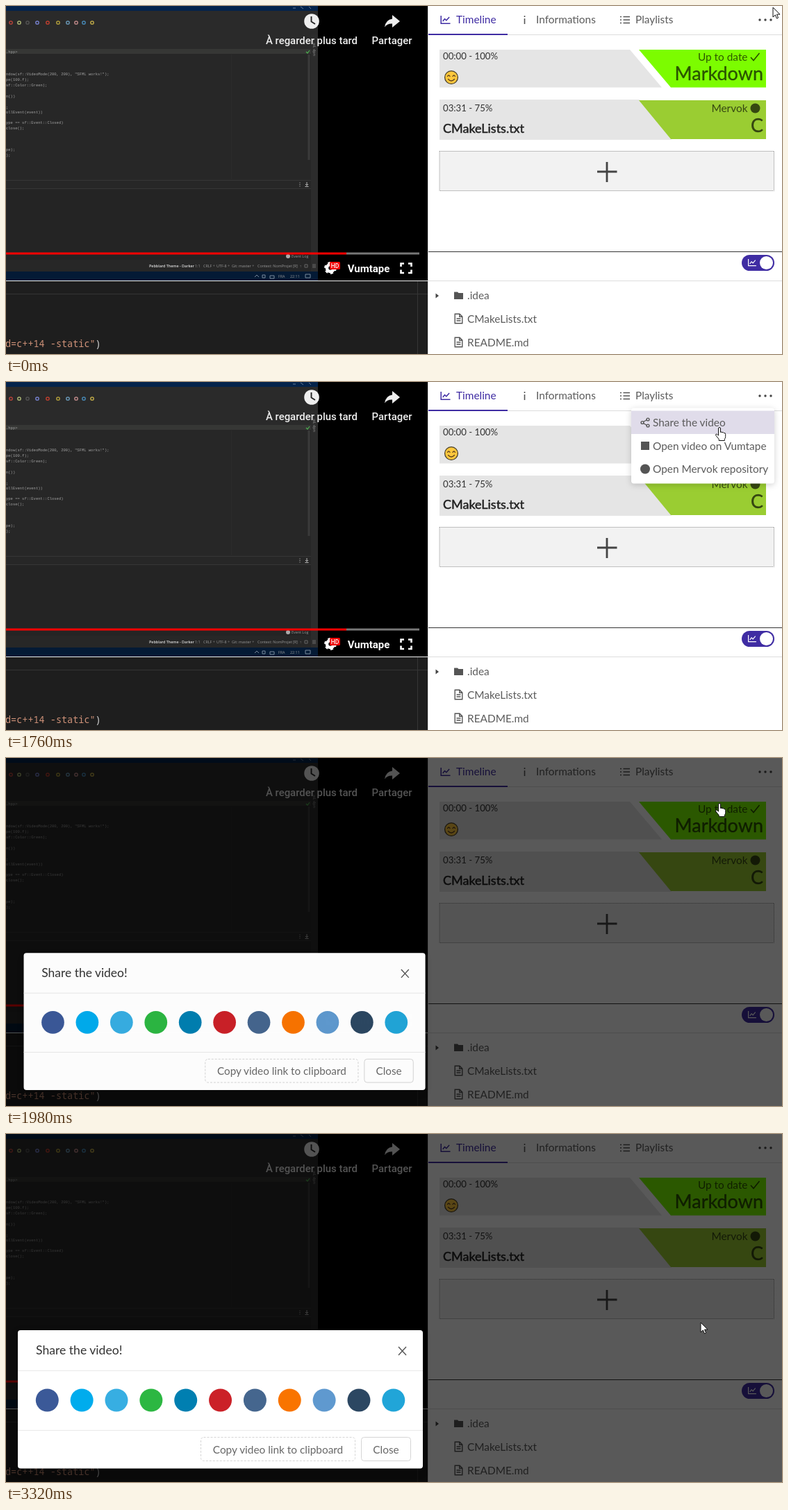
An HTML page for the animation above (3380 ms loop, 1117x502 px).

```html
<!DOCTYPE html>
<html lang="en">
<head>
<meta charset="utf-8">
<title>Share the video</title>
<style>
  html, body { margin: 0; width: 100%; height: 100%; overflow: hidden; background: #fff; }
  svg { display: block; width: 1117px; height: 502px; }
  text { font: 15.4px Lato, sans-serif; fill: #5c5c5c; white-space: pre; }
  .small { font-size: 13.2px; fill: #333; }
  .big { font-size: 27px; }
  .file { font-size: 18px; fill: #222; stroke: #222; stroke-width: .5; }
  .tag text { fill: #000; fill-opacity: .65; text-anchor: end; }
  .tag .big { stroke: #000; stroke-opacity: .5; stroke-width: .4; }
  .player text { font: 500 14.9px Roboto, sans-serif; fill: #eee; text-anchor: middle; }
  .tiny text { font: 5.5px "Liberation Mono", monospace; fill: #a0a0a0; }
  .tiny .ui { font: 5.4px "Open Sans", sans-serif; fill: #999; }
  .code { font: 13.5px "Noto Sans Mono", monospace; fill: #ce9178; }
  .line { fill: none; stroke: #555; stroke-width: 1.4; }
  .modal .mid { fill: #686868; text-anchor: middle; }

  /* Every animation is paused and placed by the clock in --t. */
  .mask, .menu, .hover, .modal, .cursor, .arrow, .hand {
    animation-play-state: paused;
    animation-fill-mode: both;
    animation-delay: calc((var(--at, 0) - var(--t, 0)) * 1ms);
  }
  .mask { --at: 1760; animation-name: fade; animation-duration: 200ms; animation-timing-function: linear; }
  .hover { --at: 1460; animation-name: fade; animation-duration: 280ms; animation-timing-function: ease-in-out; }
  .modal {
    --at: 1760;
    animation-name: zoom; animation-duration: 300ms;
    animation-timing-function: cubic-bezier(.08, .82, .17, 1);
    transform-origin: 1025px 66px;
  }
  .menu {
    animation-name: drop, lift;
    animation-duration: 200ms;
    animation-timing-function: cubic-bezier(.23, 1, .32, 1), cubic-bezier(.755, .05, .855, .06);
    animation-fill-mode: both, forwards;
    animation-delay: calc((920 - var(--t, 0)) * 1ms), calc((1760 - var(--t, 0)) * 1ms);
    transform-origin: 900px 37px;
  }
  .cursor { animation-name: move; animation-duration: 3380ms; animation-timing-function: ease-in-out; }
  .arrow, .hand { animation-duration: 3380ms; animation-timing-function: step-end; }
  .arrow { animation-name: arrow; }
  .hand { animation-name: hand; }
  .menu > rect:first-child { filter: drop-shadow(0 2px 4px rgba(0, 0, 0, .18)); }
  .modal > rect:first-child { filter: drop-shadow(0 4px 6px rgba(0, 0, 0, .15)); }

  @keyframes fade { from { opacity: 0; } to { opacity: 1; } }
  @keyframes zoom { from { opacity: 0; transform: scale(0); } to { opacity: 1; transform: scale(1); } }
  @keyframes drop { from { opacity: 0; transform: scaleY(.8); } to { opacity: 1; transform: scaleY(1); } }
  @keyframes lift { from { opacity: 1; transform: scaleY(1); } to { opacity: 0; transform: scaleY(.8); } }
  @keyframes move {
    0%, 8% { transform: translate(1104px, 2px); }
    21.8%, 38% { transform: translate(1098px, 17px); }
    50%, 85.3% { transform: translate(1027px, 65px); }
    97.8%, 100% { transform: translate(1000px, 272px); }
  }
  @keyframes arrow { 0% { opacity: 1; } 17% { opacity: 0; } 85.4%, 100% { opacity: 1; } }
  @keyframes hand { 0% { opacity: 0; } 17% { opacity: 1; } 85.4%, 100% { opacity: 0; } }
</style>
</head>
<body>
<svg viewBox="0 0 1117 502" xmlns="http://www.w3.org/2000/svg">
  <defs>
    <g id="chart" fill="none"><path d="M.7 0V11.3H14M3.2 8 6 4.6 8.4 6.8 12.6 2"/></g>
    <g id="page"><path class="line" d="M.7.7H7.5L11.3 4.5V14.3H.7ZM7.3.9V4.7H11M3 7.5H9M3 10.5H9"/></g>
  </defs>

  <!-- video -->
  <rect width="607" height="396" fill="#000"/>
  <g class="tiny">
    <rect width="449" height="396" fill="#272727"/>
    <rect width="449" height="7" fill="#04234b"/>
    <path d="M413 3h4M424 1l4 3M436 1l3 3" stroke="#7d93ad" stroke-width=".8"/>
    <rect y="7" width="449" height="55" fill="#2a2a2a"/>
    <rect y="62" width="439" height="7" fill="#363735"/>
    <rect x="439" y="41" width="10" height="342" fill="#2c2c2c"/>
    <path d="M324.500 70V250" stroke="#2c2c2c"/>
    <rect x="434.500" y="70" width="3" height="152" fill="#3b3b3b"/>
    <path d="M432 66l2 2 3-4" fill="none" stroke="#4caf50" stroke-width="1.200"/>
    <path d="M0 251.500H439M0 263.500H439" stroke="#363636"/>
    <rect y="264" width="439" height="102" fill="#242424"/>
    <path d="M423 254.500v1M423 257v1M423 259.500v1M433 254v5M431 257l2 2 2-2M430.500 260.500h5" fill="none" stroke="#bbb"/>
    <g id="tools"></g>
    <g id="lines"></g>
    <text class="ui" transform="translate(442 53) rotate(90)">ad, dpn</text>
    <circle cx="406" cy="361" r="3" fill="#aaa"/>
    <text class="ui" x="411" y="363">Event Log</text>
    <text class="ui" x="206" y="377" style="fill:#ddd;font-weight:600">Pebblard Theme - Darker</text>
    <text class="ui" x="272" y="377">1:1</text>
    <text class="ui" x="284" y="377">CRLF ÷</text>
    <text class="ui" x="303" y="377">UTF-8 ÷</text>
    <text class="ui" x="325" y="377">Git: master ÷</text>
    <text class="ui" x="362" y="377">Context: NomProjet [R]  ↑</text>
    <path d="M430 373h4v4h-4zM441 373h5M441 375h5M441 377h5" fill="none" stroke="#777" stroke-width=".8"/>
    <rect y="383" width="449" height="13" fill="#041a35"/>
    <path d="M358 391l3-3 3 3M369 388h4v4h-4zM380 389h6v4h-6zM431 387h7v5h-7z" fill="none" stroke="#8797a9" stroke-width=".9"/>
    <text class="ui" x="392" y="392">FRA</text>
    <text class="ui" x="409" y="392">22:11</text>
  </g>
  <g class="player">
    <circle cx="440" cy="22" r="10.800" fill="#eee"/>
    <path d="M439.500 15V22.500L445 26" fill="none" stroke="#222" stroke-width="1.900"/>
    <text x="440" y="55">À regarder plus tard</text>
    <path d="M556 13 567 22 556 31V25.500Q549 25 545 30.500 546.500 20 556 18.500Z" fill="#eee"/>
    <text x="555.500" y="55">Partager</text>
    <rect x="490" y="355.500" width="105" height="3" fill="#777"/>
    <rect y="355.500" width="490" height="3" fill="#f00"/>
    <circle cx="467" cy="378" r="5" fill="none" stroke="#fff" stroke-width="4.500"/>
    <circle cx="467" cy="378" r="7.700" fill="none" stroke="#fff" stroke-width="2.400" stroke-dasharray="4 4.060"/>
    <rect x="466" y="369" width="15" height="11" rx="1.500" fill="#e00"/>
    <text x="473.500" y="377.800" style="font-size:8.500px;fill:#fff">HD</text>
    <text x="522" y="384" style="font-size:15px;font-weight:700;fill:#fff">Vumtape</text>
    <path d="M568.500 376V371.500H573M579 371.500H583.500V376M583.500 380.500V385H579M573 385H568.500V380.500" fill="none" stroke="#fff" stroke-width="2.600"/>
  </g>

  <!-- code editor -->
  <rect y="396" width="607" height="106" fill="#1e1e1e"/>
  <path d="M0 415.500H607M592.500 397V502" stroke="#353535"/>
  <path d="M0 396.500H607" stroke="#eee"/>
  <text class="code" x="-1" y="492">d=c++14 -static"<tspan fill="#d4d4d4">)</tspan></text>

  <!-- side panel -->
  <rect x="607" width="510" height="502" fill="#fff"/>
  <path d="M607.500 0V502M608 41.500H1117M608 396.500H1117" stroke="#ddd"/>
  <path d="M608 41H722" stroke="#3f2ca3" stroke-width="2"/>
  <use href="#chart" x="625.500" y="14" stroke="#3f2ca3" stroke-width="1.500"/>
  <text x="648" y="25" style="fill:#3f2ca3">Timeline</text>
  <path d="M746.500 18V26M746.500 14V16" stroke="#555" stroke-width="1.600"/>
  <text x="763" y="25">Informations</text>
  <path d="M888.500 15.500H898M888.500 20H898M888.500 24.500H898M884 15.500H886M884 20H886M884 24.500H886" stroke="#555" stroke-width="1.500"/>
  <text x="906" y="25">Playlists</text>
  <g fill="#444"><circle cx="1085" cy="20" r="1.700"/><circle cx="1093" cy="20" r="1.700"/><circle cx="1101" cy="20" r="1.700"/></g>

  <path d="M624 63H898L944 117.500H624ZM624 135H912L958 193H624Z" fill="#e5e5e5"/>
  <path d="M911 63H1094V117.500H957Z" fill="#7cfc00"/>
  <path d="M911 136H1094V192H957Z" fill="#9acd32"/>
  <text class="small" x="629" y="77">00:00 - 100%</text>
  <g fill="none" stroke="#5d4020" stroke-width="1.300" stroke-linecap="round">
    <circle cx="641" cy="103" r="9.400" fill="#ffc83d" stroke="#49412f"/>
    <path d="M635.500 101.500Q637.300 98.500 639 101.500M643 101.500Q644.700 98.500 646.500 101.500M636.500 105.500Q641 110.500 645.500 105.500"/>
  </g>
  <text class="small" x="629" y="152">03:31 - 75%</text>
  <text class="file" x="629" y="183">CMakeLists.txt</text>
  <g class="tag">
    <text x="1067.500" y="79">Up to date</text>
    <path d="M1072 74 1076 78.500 1084.500 68" fill="none" stroke="#000" stroke-opacity=".7" stroke-width="1.500"/>
    <text class="big" x="1090" y="107">Markdown</text>
    <text x="1067.500" y="153">Mervok</text>
    <circle cx="1078.500" cy="147.500" r="7" fill="#000" fill-opacity=".65"/>
    <text class="big" x="1090" y="182">C</text>
  </g>
  <rect x="624" y="209.500" width="481.500" height="57" fill="#f2f2f2" stroke="#888" stroke-dasharray="1 1"/>
  <path d="M851 239H879.500M865 225V254" stroke="#444" stroke-width="2.800"/>

  <path d="M608 354.500H1117" stroke="#333"/>
  <rect x="1059" y="359" width="47" height="23" rx="11.500" fill="#3f2ca3"/>
  <circle cx="1094.500" cy="370.500" r="9.500" fill="#fff"/>
  <use href="#chart" transform="translate(1068 365) scale(.85)" stroke="#fff" stroke-width="1.400"/>

  <path d="M618.500 414.500 623 418 618.500 421.500Z" fill="#444"/>
  <path d="M645 412.500H650L651.500 414H658V423H645Z" fill="#555"/>
  <text x="664" y="423">.idea</text>
  <use href="#page" x="645.500" y="443.500"/>
  <text x="664" y="457">CMakeLists.txt</text>
  <use href="#page" x="645.500" y="477.500"/>
  <text x="664" y="491">README.md</text>

  <rect class="mask" width="1117" height="502" fill="#000" fill-opacity=".65"/>

  <g class="menu">
    <rect x="900" y="37.500" width="206" height="109" rx="4" fill="#fff"/>
    <rect class="hover" x="900" y="41.500" width="206" height="33.500" fill="#e0dcea"/>
    <path class="line" d="M917.500 57.500 922.500 54.500M917.500 59.500 922.500 62.500"/>
    <g class="line"><circle cx="916" cy="58.500" r="1.900"/><circle cx="924" cy="54" r="1.900"/><circle cx="924" cy="63" r="1.900"/></g>
    <text x="931" y="63.500">Share the video</text>
    <rect x="914" y="86" width="12" height="12" fill="#555"/>
    <text x="931" y="97.500">Open video on Vumtape</text>
    <circle cx="920" cy="125.500" r="7" fill="#555"/>
    <text x="931" y="130.500">Open Mervok repository</text>
  </g>

  <g class="modal">
    <rect x="17" y="283" width="583" height="199.500" rx="4" fill="#fff"/>
    <text x="43" y="318" style="font-size:17.600px;fill:#333">Share the video!</text>
    <path class="line" d="M565 307 576 319M576 307 565 319"/>
    <path d="M17 341.500H600M17 427.500H600" stroke="#e8e8e8"/>
    <g id="social"></g>
    <g fill="#fff" stroke="#d5d5d5">
      <rect x="280.500" y="437.500" width="222" height="34" rx="4" stroke-dasharray="3 2"/>
      <rect x="511.500" y="437.500" width="71" height="34" rx="4"/>
    </g>
    <text class="mid" x="391.500" y="460.500">Copy video link to clipboard</text>
    <text class="mid" x="547" y="460.500">Close</text>
  </g>

  <g class="cursor" fill="#fff" stroke="#111" stroke-linejoin="round">
    <path class="arrow" d="M0 0V14L3.300 10.900 5.500 16 7.600 15 5.500 10.100H10Z"/>
    <path class="hand" d="M-1.500 2A1.500 1.500 0 0 1 1.500 2V7.500Q3 6.500 4 7.800 5.400 7 6.300 8.500 8.700 8 8.700 10.500V13.500Q8.700 16 7.300 17.500V19.500H-.8V17.500L-5 12.300Q-6 10.600-4.600 10-3.400 9.800-1.500 12.200Z"/>
  </g>
</svg>
<script>
  const fill = (id, html) => document.getElementById(id).innerHTML = html.join("");

  const code = [
    [67, ".hpp>"],
    [99, 'ndow(sf::VideoMode(200, 200), "SFML works!");'],
    [107, "pe(100.f);"],
    [115, "sf::Color::Green);"],
    [131, "n())"],
    [147, ";"],
    [154, "ollEvent(event))"],
    [169, "ype == sf::Event::Closed)"],
    [177, "close();"],
    [208, "pe);"],
    [216, ");"]
  ];
  fill("lines", code.map(([y, s]) => `<text x="0" y="${y + 1}">${s}</text>`));

  const tools = {
    7: "#c0453c", 19: "#b5c07a", 31: "#555", 45: "#7b86d8", 60: "#c9402f",
    75: "#b9a53c", 89: "#6e9fc0", 101: "#c98f8f", 112: "#4a90c0", 124: "#c9b24a"
  };
  fill("tools", Object.entries(tools).map(([x, c]) =>
    `<circle cx="${x}" cy="24" r="2.2" fill="none" stroke="${c}" stroke-width="1.3"/>`));

  const colors = ["#3b5998", "#00aced", "#37aee2", "#2cb742", "#007fb1", "#cb2128",
    "#45668e", "#f97400", "#5f99cf", "#2c4762", "#21a5d8"];
  fill("social", colors.map((c, i) =>
    `<circle cx="${59.3 + 49.85 * i}" cy="384" r="16.5" fill="${c}"/>`));

  const LOOP = 3380;
  const tick = n => n ? 20 * Math.round((73.7 * n - 4) / 20) : 0;
  const start = performance.now();

  function draw() {
    const t = (performance.now() - start) % LOOP;
    let n = Math.floor(t / 73.7) + 1;
    while (tick(n) > t) n--;
    document.documentElement.style.setProperty("--t", tick(n) % LOOP);
    requestAnimationFrame(draw);
  }
  draw();
</script>
</body>
</html>
```
